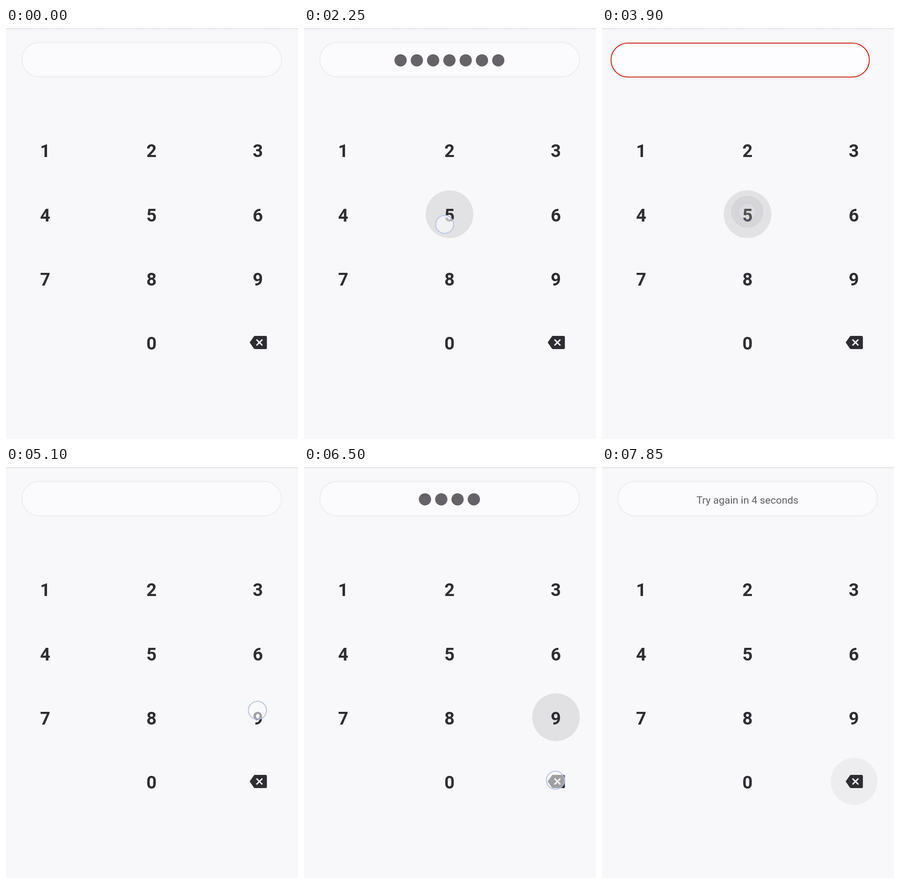
Recreate the animation shown at these times as an HTML page. Size 598 by 841 pixels, loop 8000 ms.

```html
<!DOCTYPE html>
<html lang="en">
<head>
<meta charset="utf-8">
<title>PIN pad</title>
<style>
  html, body { margin: 0; width: 100%; height: 100%; overflow: hidden; background: #f8f7fa; }
  svg { display: block; width: 598px; height: 841px; }
  text { font-family: Roboto, Arial, sans-serif; text-anchor: middle; }
  .digit { font-size: 36.5px; font-weight: 700; fill: #2e2d31; }
  #message { font-size: 21px; fill: #5f5e63; }
  #dots { fill: #656367; }
</style>
</head>
<body>
<svg id="stage" viewBox="0 0 598 841">
  <defs>
    <linearGradient id="shade" x2="0" y2="1">
      <stop offset="0" stop-color="#e2e2e4"/>
      <stop offset="1" stop-color="#f8f7fa"/>
    </linearGradient>
  </defs>
  <rect width="598" height="841" fill="#f8f7fa"/>
  <rect width="598" height="4" fill="url(#shade)"/>
  <g id="field">
    <rect id="calm" x="32.5" y="29.5" width="531.5" height="70.5" rx="35.2" fill="#fbfafc" stroke="#ececee" stroke-width="1.8"/>
    <rect id="alarm" x="33" y="30.8" width="529" height="69.5" rx="34.7" fill="#fdfcfe" stroke="#c41c0c" stroke-width="1.8"/>
    <text id="message" x="298" y="75"></text>
  </g>
  <g id="dots"></g>
  <g id="ripples"></g>
  <g id="digits"></g>
  <path d="M510 630H531.5Q534.3 630 534.3 632.8V654.2Q534.3 657 531.5 657H510Q508.4 657 507.4 655.6L499 643.5L507.4 631.4Q508.4 630 510 630Z" fill="#2e2d31"/>
  <path d="M513 637.5L525 649.5M525 637.5L513 649.5" stroke="#f8f7fa" stroke-width="2.9"/>
  <circle id="ghost" r="18" fill="#f8f7fa" fill-opacity=".25"/>
  <circle id="touch" r="18.5" fill="#fafafc" fill-opacity=".56" stroke="#b9c3e4" stroke-opacity=".9" stroke-width="2.2"/>
</svg>
<script>
const LOOP = 8000;
const SHAKE = [0, 25, -25, 25, -25, 15, -15, 6, -6, 0];
const SHAKE_STEP = 50;
const ERRORS = [3600, 6650];
const $ = id => document.getElementById(id);
const clamp = v => Math.max(0, Math.min(1, v));

function add(parent, tag, attrs) {
  const el = document.createElementNS("http://www.w3.org/2000/svg", tag);
  set(el, attrs);
  parent.append(el);
  return el;
}
function set(el, attrs) {
  for (const name in attrs) el.setAttribute(name, attrs[name]);
}

// Digits
for (let n = 0; n < 10; n++) {
  const col = n ? (n - 1) % 3 : 1;
  const row = n ? Math.floor((n - 1) / 3) : 3;
  add($("digits"), "text", { class: "digit", x: 80.3 + col * 217.7, y: 264.3 + row * 131.2 }).textContent = n;
}

// Keys that get pressed
function makeKey(id, x, y, r, shade, hold) {
  const clip = add(document.querySelector("defs"), "clipPath", { id: "clip" + id });
  add(clip, "circle", { cx: x, cy: y, r });
  const group = add($("ripples"), "g", { "clip-path": `url(#clip${id})` });
  return {
    shade, hold,
    base: add(group, "circle", { cx: x, cy: y, r }),
    wave: add(group, "circle", { cx: x, cy: y, r: 0 }),
  };
}
const five = makeKey("5", 298, 381, 49, .09, 400);
const nine = makeKey("9", 516, 512, 49, .095, 400);
const erase = makeKey("Del", 516.3, 643.2, 48.2, .045, LOOP);
const keys = [five, nine, erase];

// Taps in order of time
const taps = [];
const tap = (key, time, x, y, drift = 0, hold = 130) => taps.push({ key, time, x, y, drift, hold });
[465, 900].forEach(time => tap(five, time, 288, 402, 1));
for (let i = 0; i < 13; i++) tap(five, 1330 + i * 187, 288, 402, 1);
tap(five, 3842, 297.5, 376, 0, 20);
[5115, 5450, 5790, 6140].forEach(time => tap(nine, time, 515, 498));
tap(erase, 6515, 515, 641, 0, 150);

const dots = Array.from({ length: 15 }, () => add($("dots"), "circle", { cy: 66.2 }));

function popScale(age) {
  if (age < 75) return 1.28 * age / 75;
  return 1 + .28 * (1 - clamp((age - 75) / 90));
}

function drawDots(t) {
  const start = Math.max(0, ...ERRORS.filter(e => e <= t));
  const typed = taps.filter(p => p.key !== erase && p.time >= start && p.time <= t);
  // Taps right after the first error are not counted
  const count = start === ERRORS[0] && t < 5000 || start === ERRORS[1] ? 0
    : typed.filter(p => p.time > 5000 || t < 5000).length;
  dots.forEach((dot, i) => {
    const last = i === count - 1;
    const scale = last ? popScale(t - typed[typed.length - 1].time) : 1;
    set(dot, { cx: 297.8 + (i - (count - 1) / 2) * 33.35, r: i < count ? 12.5 * scale : 0 });
  });
}

function drawField(t) {
  const error = ERRORS.filter(e => e <= t).pop();
  const age = error === undefined ? LOOP : t - error;
  const step = age / SHAKE_STEP;
  const i = Math.floor(step);
  const shift = i < SHAKE.length - 1 ? SHAKE[i] + (SHAKE[i + 1] - SHAKE[i]) * (step - i) : 0;
  const red = 1 - clamp((age - 500) / 300);
  set($("field"), { transform: `translate(${shift})` });
  set($("alarm"), { opacity: red });
  set($("calm"), { opacity: red === 1 ? 0 : 1 });
  $("message").textContent = t < ERRORS[1] ? "" : `Try again in ${t < 7650 ? 5 : 4} seconds`;
}

function drawRipples(t) {
  for (const key of keys) {
    const past = taps.filter(p => p.key === key && p.time <= t);
    const shades = past.map(p => {
      const age = t - p.time;
      return key.shade * clamp(age / 50) * (1 - clamp((age - key.hold) / 160));
    });
    set(key.base, { "fill-opacity": Math.max(0, ...shades) });
    const p = past[past.length - 1];
    const age = p ? t - p.time : LOOP;
    const alpha = key.shade * .62 * (1 - clamp((age - 75) / 45));
    set(key.wave, { "fill-opacity": alpha });
    if (p) set(key.wave, { cx: p.x, cy: p.y, r: Math.min(age, 200) * .56 });
  }
}

function drawTouch(t) {
  const p = taps.filter(p => p.time - 20 <= t).pop();
  const age = p ? t - p.time : LOOP;
  const alpha = 1 - clamp((age - p?.hold) / 55);
  const visible = p ? alpha : 0;
  set($("touch"), { opacity: visible });
  set($("ghost"), { opacity: p && p.drift && age < 110 ? visible : 0 });
  if (!p) return;
  const moved = Math.max(0, age) * p.drift;
  set($("touch"), { cx: p.x + Math.min(moved, 140) * .05, cy: p.y - Math.min(moved, 75) * .15 });
  set($("ghost"), { cx: p.x - 1, cy: p.y + 3 });
}

const begin = performance.now();
function frame() {
  const t = (performance.now() - begin) % LOOP;
  drawDots(t);
  drawField(t);
  drawRipples(t);
  drawTouch(t);
  requestAnimationFrame(frame);
}
frame();
</script>
</body>
</html>
```
